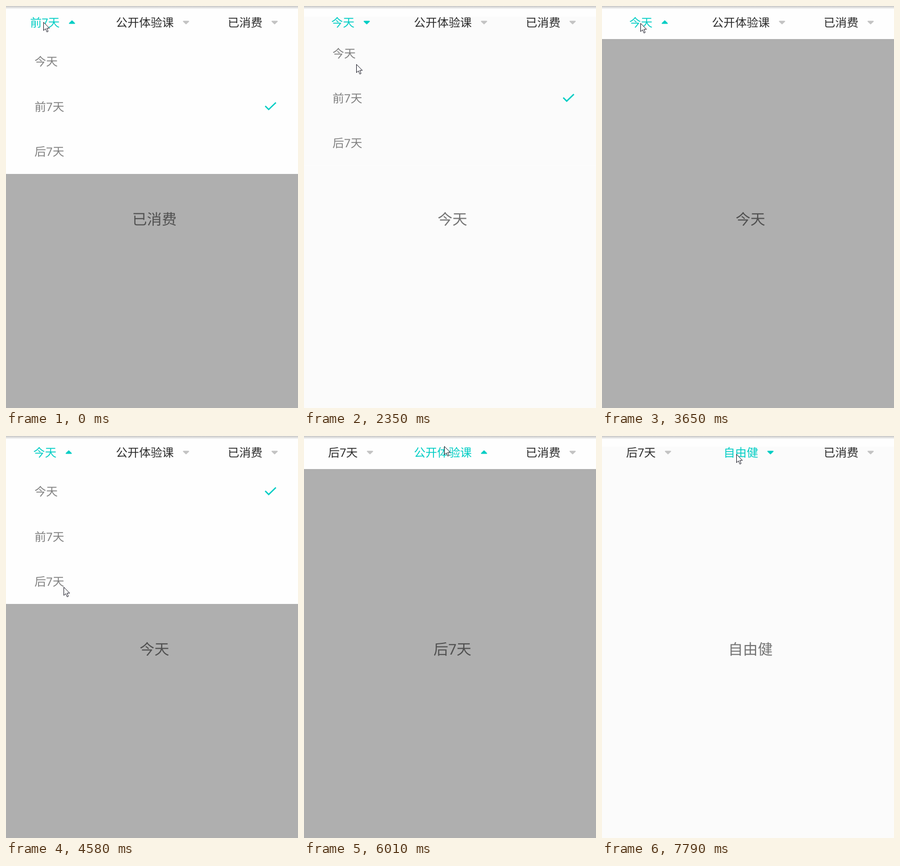
Write an HTML page with a canvas that moves like this. It is 548x754 px and loops after 8000 ms.

```html
<!DOCTYPE html>
<html lang="zh-CN">
<head>
<meta charset="utf-8">
<title>下拉筛选菜单</title>
<style>
  html, body { margin: 0; width: 100%; height: 100%; overflow: hidden; background: #fbfbfb; }
  canvas { display: block; }
</style>
</head>
<body>
<canvas width="548" height="754"></canvas>
<script>
const ctx = document.querySelector('canvas').getContext('2d');
const W = 548, H = 754, LOOP = 8000, STEP = 122;
const HEADER = 62, PANEL = 253, ROW = 84.4;
const TEAL = '#00cdc4', WHITE = '#fefefe', PAGE = '#fbfbfb';
const FONT = 'Roboto, "Noto Sans CJK SC", "Noto Sans CJK", sans-serif';

const DAYS = ['今天', '前7天', '后7天'];
const ORDERS = ['全部订单', '自由健', '公开体验课'];
const TAB_CENTERS = [73, 260.5, 448.5];

const MENUS = [
  { tab: 0, items: DAYS, checked: 1, pick: 0, open: -1000, close: 1800, closing: 690 },
  { tab: 0, items: DAYS, checked: 0, pick: 2, open: 3650, close: 4860, closing: 600 },
  { tab: 1, items: ORDERS, checked: 2, pick: 1, open: 6010, close: 7160, closing: 600 },
];

const POINTER_START = { x: 70, y: 30 };
const MOVES = [
  { from: 740, to: 1130, x: 114, y: 192 },
  { from: 1260, to: 1520, x: 98, y: 109 },
  { from: 2930, to: 3500, x: 72, y: 32 },
  { from: 4040, to: 4580, x: 108, y: 283 },
  { from: 5000, to: 5580, x: 263, y: 19 },
  { from: 6130, to: 6910, x: 154, y: 191 },
  { from: 7290, to: 7790, x: 252, y: 34 },
];

const clamp = v => Math.max(0, Math.min(1, v));
const smooth = v => v * v * (3 - 2 * v);

// Eased progress in steps: the first one lands at `from`, the last at `to`.
function steppedProgress(t, from, to) {
  const n = Math.round((to - from) / STEP);
  return smooth(clamp((Math.floor((t - from) / (to - from) * n) + 1) / (n + 1)));
}

function pointerAt(t) {
  let { x, y } = POINTER_START;
  for (const move of MOVES) {
    const k = steppedProgress(t, move.from, move.to);
    x += (move.x - x) * k;
    y += (move.y - y) * k;
  }
  return [Math.round(x), Math.round(y)];
}

function stateAt(t) {
  const titles = ['前7天', '公开体验课', '已消费'];
  let message = '已消费', menu;
  for (const m of MENUS) {
    if (t >= m.open) menu = m;
    if (t >= m.close) message = titles[m.tab] = m.items[m.pick];
  }
  const isOpen = t < menu.close;
  const opened = clamp(Math.floor((t - menu.open) / STEP) / 3);
  const closed = isOpen ? 0 : Math.floor((t - menu.close) / menu.closing * 5) / 4;
  return {
    titles, message, menu, isOpen,
    shift: isOpen ? -PANEL * (1 - smooth(opened)) : -37 * closed ** 3,
    mask: clamp(1 - closed * 2),
    panelVisible: closed <= 1,
  };
}

function rect(x, y, w, h, fill) {
  ctx.fillStyle = fill;
  ctx.fillRect(x, y, w, h);
}

function text(str, x, baseline, size, color, align) {
  ctx.font = `${size}px ${FONT}`;
  ctx.textRendering = 'geometricPrecision';
  ctx.textAlign = align;
  ctx.fillStyle = color;
  ctx.fillText(str, x, baseline);
  return ctx.measureText(str).width;
}

function trace(points, x, y) {
  ctx.beginPath();
  points.forEach(([px, py]) => ctx.lineTo(x + px, y + py));
}

function drawArrow(x, y, up, color) {
  const s = up ? -1 : 1;
  trace([[-4.8, -1.9 * s], [4.8, -1.9 * s], [0, 2.7 * s]], x, y);
  ctx.closePath();
  ctx.lineJoin = 'round';
  ctx.lineWidth = 2;
  ctx.fillStyle = ctx.strokeStyle = color;
  ctx.fill();
  ctx.stroke();
}

function drawPanel({ menu, shift }, surface) {
  ctx.save();
  ctx.beginPath();
  ctx.rect(0, HEADER, W, PANEL);
  ctx.clip();
  rect(0, HEADER + shift, W, PANEL, surface);
  menu.items.forEach((item, i) => {
    const baseline = 112.2 + i * ROW + shift;
    text(item, 53.5, baseline, 21.75, '#808080', 'left');
    if (i === menu.checked) {
      trace([[486.5, -9], [493, -2.5], [506.5, -15.5]], 0, baseline);
      ctx.lineJoin = 'miter';
      ctx.lineWidth = 2.5;
      ctx.strokeStyle = TEAL;
      ctx.stroke();
    }
  });
  ctx.restore();
}

function drawHeader({ titles, menu, isOpen }, surface) {
  rect(0, 0, W, HEADER, surface);
  rect(0, 0, W, 20, WHITE);
  const shadow = ctx.createLinearGradient(0, 0, 0, 6);
  shadow.addColorStop(0, '#c4c4c4');
  shadow.addColorStop(1, WHITE);
  rect(0, 0, W, 6, shadow);
  titles.forEach((title, i) => {
    const active = i === menu.tab, x = TAB_CENTERS[i];
    const width = text(title, x, 39, 21.75, active ? TEAL : '#2b2b2b', 'center');
    drawArrow(x + width / 2 + 23, 30.7, active && isOpen, active ? TEAL : '#c3c3c3');
  });
}

function drawPointer(x, y) {
  trace([[0, 0], [0, 15.5], [3.6, 12.2], [6.2, 18.2], [8.6, 17.2], [6.1, 11.3], [11, 11.3]],
    x + 0.5, y + 0.5);
  ctx.closePath();
  ctx.lineJoin = 'miter';
  ctx.lineWidth = 1;
  ctx.fillStyle = '#fff';
  ctx.strokeStyle = '#1c1c28';
  ctx.fill();
  ctx.stroke();
}

function draw(t) {
  const state = stateAt(t);
  const surface = state.isOpen ? WHITE : PAGE;
  rect(0, 0, W, H, PAGE);
  text(state.message, 278.5, 410, 27.8, '#737373', 'center');
  rect(0, HEADER, W, H - HEADER, `rgba(0, 0, 0, ${0.307 * state.mask})`);
  if (state.panelVisible) drawPanel(state, surface);
  drawHeader(state, surface);
  drawPointer(...pointerAt(t));
}

function tick() {
  draw(performance.now() % LOOP);
  requestAnimationFrame(tick);
}
tick();
</script>
</body>
</html>
```
